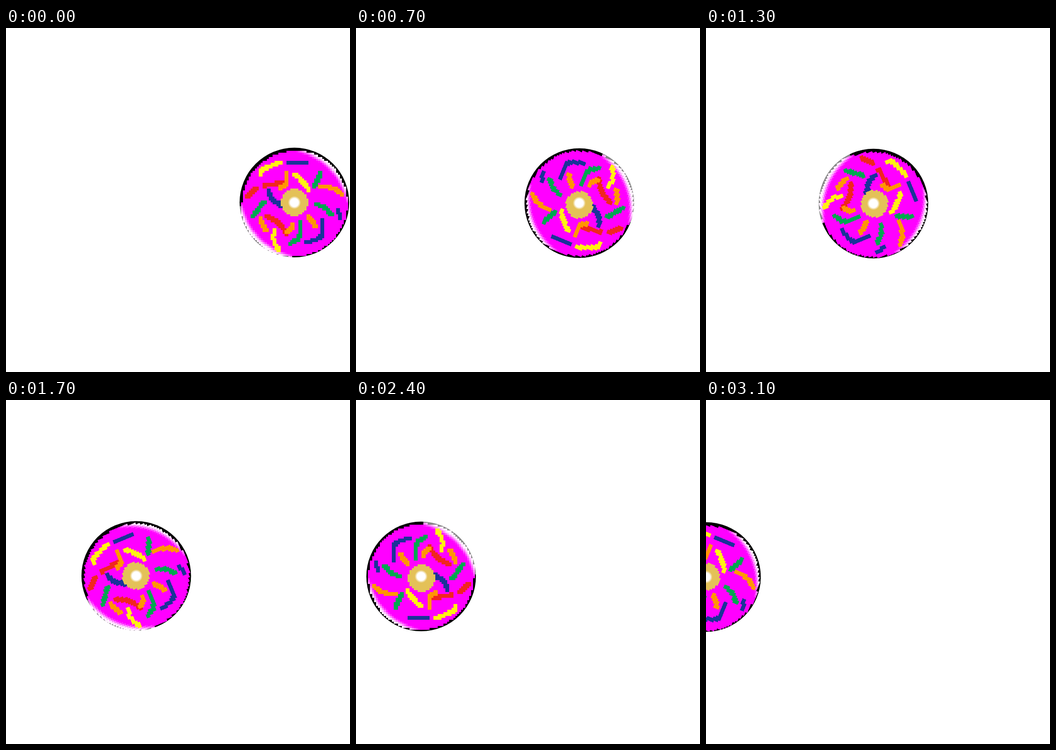
Recreate the animation shown at these times as an HTML page with a canvas. Size 720 by 720 pixels, loop 3.2 s.

```html
<!DOCTYPE html>
<html>
<head>
<meta charset="utf-8">
<title>Rolling donut</title>
<style>
  html, body { margin: 0; width: 100%; height: 100%; overflow: hidden; background: #fff; }
  canvas { display: block; }
</style>
</head>
<body>
<canvas id="stage" width="720" height="720"></canvas>
<script>
const CELL = 4.15, GRID = 58, HALF = GRID / 2;
const STEP_MS = 100, STEPS = 32;
const RADIUS = 114.7;

const YELLOW = '#fff212', BLUE = '#1a3399', RED = '#f1261f', ORANGE = '#ff9600', GREEN = '#00a651';

// Each sprinkle is a polyline around the middle of the donut.
const SPRINKLES = [
  [YELLOW, -71, -58, -68, -68, -50, -76, -31, -83],
  [YELLOW, 1, -60, 11, -51, 22, -39, 30, -26],
  [YELLOW, -43, 58, -44, 76, -39, 90, -32, 99],
  [BLUE, -14, -81, 5, -84, 25, -81],
  [BLUE, -56, -24, -51, -13, -39, -1, -28, 7],
  [BLUE, 92, 15, 95, 32],
  [BLUE, 58, 36, 60, 66, 50, 76, 26, 84],
  [RED, -64, -35, -43, -38, -23, -43],
  [RED, -78, -30, -90, -20, -100, -11],
  [RED, -60, 29, -42, 37, -27, 49, -17, 66],
  [GREEN, 56, -63, 49, -48, 42, -33],
  [GREEN, -63, -2, -76, 15, -88, 30],
  [GREEN, 11, 43, 13, 64, 8, 76, -9, 87],
  [GREEN, 46, 4, 65, 11, 77, 25],
  [ORANGE, -18, -64, -18, -39, -30, -29],
  [ORANGE, 56, -34, 82, -30, 101, -16],
  [ORANGE, -72, 32, -66, 46, -60, 60],
  [ORANGE, -3, 46, -7, 55, -15, 64],
  [ORANGE, 29, 29, 37, 40, 45, 50]
];

function eachCell(paint) {
  for (let row = 0; row < GRID; row++)
    for (let col = 0; col < GRID; col++)
      paint(col, row, (col + 0.5 - HALF) * CELL, (row + 0.5 - HALF) * CELL);
}

// Icing with a dark rim and two soft highlights on opposite sides;
// the rim pales beside the lower left highlight.
function icingColor(x, y) {
  const r = Math.hypot(x, y - 2), angle = Math.atan2(y - 2, x);
  const shine = Math.sqrt(Math.max(0, -Math.sin(2 * angle)));
  const pale = x < 0 && shine > 0.3;
  const rim = pale ? 113 : x < 0 && y < 0 ? 109 : 111;
  if (r > rim) return pale ? '#888' : '#000';
  const white = Math.min(0.95, Math.max(0, (r - 111 + 11 * shine) / 9));
  return `rgb(255, ${Math.round(255 * white)}, 255)`;
}

function drawSprinkle(g, [color, ...p]) {
  g.fillStyle = color;
  for (let i = 0; i + 3 < p.length; i += 2) {
    for (let k = 0; k <= 20; k++) {
      const x = p[i] + (p[i + 2] - p[i]) * k / 20;
      const y = p[i + 1] + (p[i + 3] - p[i + 1]) * k / 20;
      g.fillRect(Math.round(x / CELL) + HALF - 1, Math.round(y / CELL) + HALF - 1, 2, 2);
    }
  }
}

function makeDonut() {
  const sprite = document.createElement('canvas');
  sprite.width = sprite.height = GRID;
  const g = sprite.getContext('2d');
  eachCell((col, row, x, y) => {
    g.fillStyle = icingColor(x, y);
    g.fillRect(col, row, 1, 1);
  });
  SPRINKLES.forEach(s => drawSprinkle(g, s));
  g.fillStyle = '#e4c158';
  eachCell((col, row, x, y) => {
    if (Math.hypot(x, y) < 28.7) g.fillRect(col, row, 1, 1);
  });
  return sprite;
}

const ctx = document.getElementById('stage').getContext('2d');
const donut = makeDonut();
const hole = ctx.createRadialGradient(0, 0, 8.5, 0, 0, 13.5);
hole.addColorStop(0, '#fff');
hole.addColorStop(1, 'rgba(255, 255, 255, 0)');

function circle(r) {
  ctx.beginPath();
  ctx.arc(0, 0, r, 0, 2 * Math.PI);
}

function draw(step) {
  ctx.fillStyle = '#fff';
  ctx.fillRect(0, 0, 720, 720);
  ctx.save();
  ctx.translate(603.6 - 19.47 * step, 365.3 + step / 6);

  ctx.save();
  circle(RADIUS);
  ctx.clip();
  ctx.translate(0.5, 1.7);
  ctx.rotate(-step * Math.PI / 8);
  ctx.imageSmoothingEnabled = false;
  const size = GRID * CELL;
  ctx.drawImage(donut, -size / 2 - 0.5, -size / 2 - 2, size, size);
  ctx.restore();

  circle(14);
  ctx.fillStyle = hole;
  ctx.fill();
  ctx.restore();
}

function tick() {
  draw(Math.floor(performance.now() / STEP_MS) % STEPS);
  requestAnimationFrame(tick);
}
tick();
</script>
</body>
</html>
```
